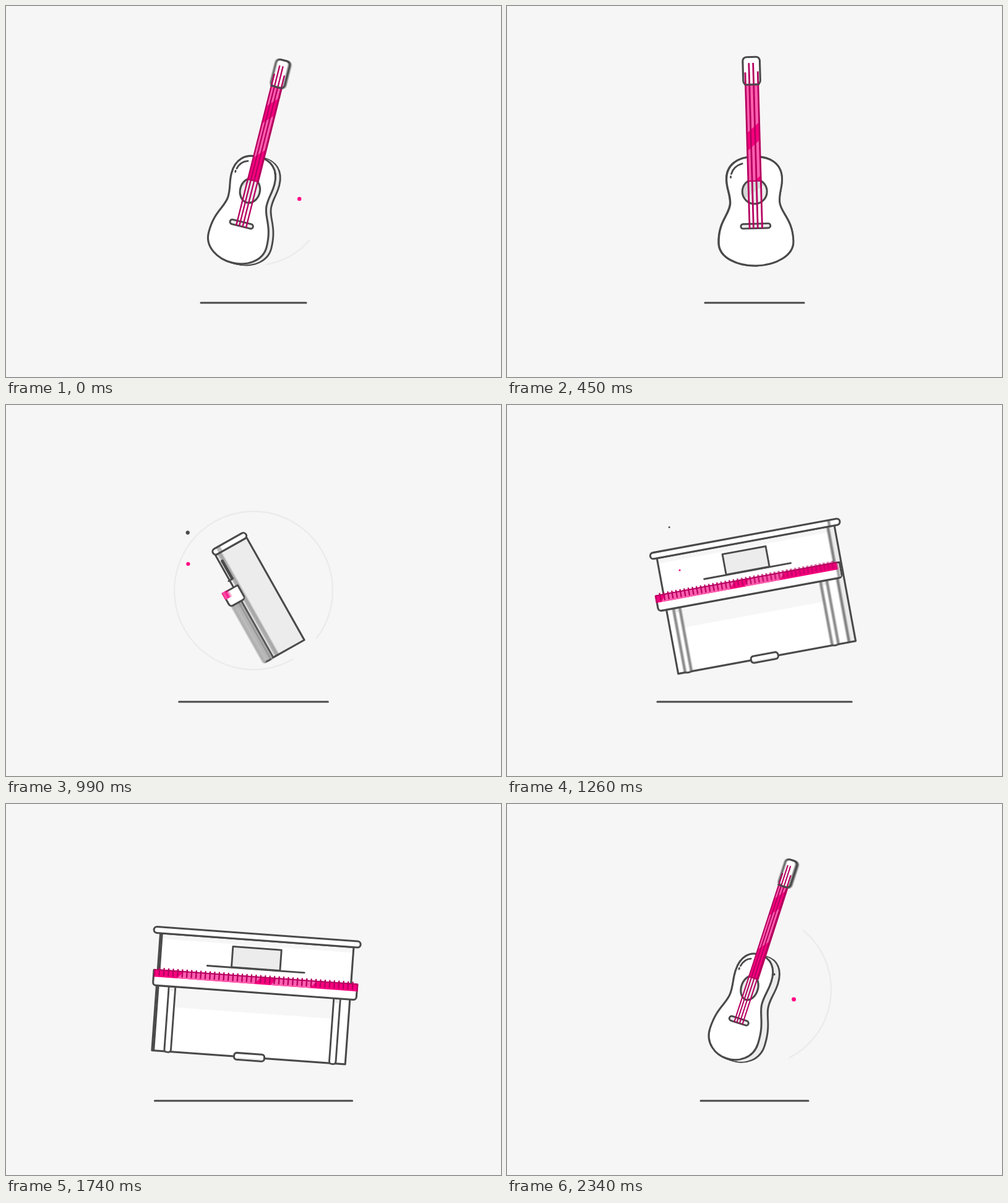
Write an HTML page with a canvas that moves like this. It is 800x600 px and loops after 2370 ms.

```html
<!DOCTYPE html>
<html lang="en">
<head>
<meta charset="utf-8">
<title>Guitar and piano</title>
<style>
html, body { margin: 0; width: 100%; height: 100%; overflow: hidden; background: #f6f6f6; }
canvas { display: block; width: 800px; height: 600px; }
</style>
</head>
<body>
<canvas id="stage" width="800" height="600"></canvas>
<script>
const LOOP = 2370, TO_PIANO = 988, TO_GUITAR = 2268;
const BG = '#f6f6f6', INK = '#4a4a4a', GREY = '#ececec', WHITE = '#fff';
const PINK = '#f7007f', LIGHT = '#ff5fb0', DEEP = '#b5005f', SPARK = '#ff0084';

const view = document.getElementById('stage').getContext('2d');
const buffer = document.createElement('canvas');
buffer.width = 800;
buffer.height = 600;
const c = buffer.getContext('2d');

// [time, tilt in degrees]
const TILT = [[-30, 18.1], [0, 14.2], [60, 11.2], [200, 6.5], [450, -1.6], [705, -12], [870, -21],
  [990, -29.4], [1050, -19], [1110, -14.5], [1260, -10.5], [1500, -3.6], [1740, 4.1], [1980, 14.4],
  [2160, 23], [2268, 30], [2340, 18.1], [2370, 14.2]];
// [time, half length of the floor line]
const FLOOR = [[-30, 87], [0, 85], [200, 81.5], [450, 80], [700, 83], [885, 97], [990, 120],
  [1080, 149], [1260, 157], [1500, 159], [1740, 159.5], [1980, 155.5], [2160, 141.5], [2268, 117],
  [2340, 87], [2370, 85]];
// [time, tail angle, head angle, radius]
const SWIRL = [[-60, -437, -437, 150], [0, -437, -370, 148], [200, -400, -60, 135],
  [290, -302, 37, 128], [360, -54, 63, 124], [390, 39, 80, 120], [440, 95, 95, 114]];

// Monotone cubic interpolation through the keys.
function at(keys, t, col = 1) {
  const n = keys.length;
  if (t <= keys[0][0]) return keys[0][col];
  if (t >= keys[n - 1][0]) return keys[n - 1][col];
  let i = 0;
  while (t > keys[i + 1][0]) i++;
  const slope = k => (keys[k + 1][col] - keys[k][col]) / (keys[k + 1][0] - keys[k][0]);
  const tangent = k => {
    if (k === 0) return slope(0);
    if (k === n - 1) return slope(n - 2);
    const a = slope(k - 1), b = slope(k);
    return a * b <= 0 ? 0 : 2 * a * b / (a + b);
  };
  const h = keys[i + 1][0] - keys[i][0], u = (t - keys[i][0]) / h;
  const p = keys[i][col], q = keys[i + 1][col];
  return p + (q - p) * u * u * (3 - 2 * u)
    + h * u * (1 - u) * ((1 - u) * tangent(i) - u * tangent(i + 1));
}

function paint(fill, stroke, width = 3.1) {
  if (fill) { c.fillStyle = fill; c.fill(); }
  if (stroke) { c.strokeStyle = stroke; c.lineWidth = width; c.stroke(); }
}

function box(x0, y0, x1, y1, r, fill, stroke, width) {
  const w = Math.max(x1 - x0, 0.1), h = y1 - y0;
  const m = Math.min(w, h) / 2;
  const radii = Array.isArray(r) ? r.map(v => Math.min(v, m)) : Math.min(r, m);
  c.beginPath();
  c.roundRect(x0, y0, w, h, radii);
  paint(fill, stroke, width);
}

function line(x0, y0, x1, y1, color = INK, width = 3.1) {
  c.beginPath();
  c.moveTo(x0, y0);
  c.lineTo(x1, y1);
  paint(null, color, width);
}

function quad(points, fill) {
  c.beginPath();
  points.forEach(p => c.lineTo(p[0], p[1]));
  c.closePath();
  paint(fill);
}

// Shared measures of a turned instrument.
function turn(tilt) {
  const a = Math.abs(tilt) / 29.5;
  const yaw = Math.min(90, 76.7 * a + 12.5 * a ** 5);
  return {
    side: tilt < 0 ? -1 : 1,
    flat: Math.max(0.004, Math.cos(yaw * Math.PI / 180)),
    depth: a ** 1.5
  };
}

function bodyPath(x, g) {
  c.beginPath();
  for (const k of [g, -g]) {
    c.moveTo(x, -56);
    c.bezierCurveTo(x + 26 * k, -57, x + 45 * k, -44, x + 45 * k, -20);
    c.bezierCurveTo(x + 45 * k, -4, x + 39.5 * k, 2, x + 40 * k, 18);
    c.bezierCurveTo(x + 41 * k, 36, x + 60.5 * k, 46, x + 60.5 * k, 82);
    c.bezierCurveTo(x + 60.5 * k, 106, x + 30 * k, 120, x, 120);
  }
}

function guitar(tilt, jitter) {
  const { side, flat: g, depth } = turn(tilt);
  const d = 23.5 * depth, x = -0.75 * d * side;
  const X = v => x + v * g;
  const back = side * d;

  const steps = Math.ceil(d / 1.5);
  for (let k = steps; k > 0; k--) { bodyPath(x + back * k / steps, g); paint(GREY, INK); }
  for (let k = steps - 1; k > 0; k--) { bodyPath(x + back * k / steps, g); paint(GREY); }
  bodyPath(x, g);
  paint(WHITE, INK);

  c.beginPath();
  c.moveTo(X(-37), -29.5);
  c.quadraticCurveTo(X(-33), -42, X(-18.7), -45.6);
  paint(null, INK, 2.8);
  line(X(-38), -25.5, X(-38.1), -23.6, INK, 2.8);

  c.beginPath();
  c.ellipse(x, 0, 20 * g, 20, 0, 0, 7);
  paint('#d6d6d6');
  c.save();
  c.clip();
  const shade = -2 - tilt;
  quad([[X(-22), shade + 15], [X(22), shade - 14], [X(22), 22], [X(-22), 22]], GREY);
  c.restore();
  c.beginPath();
  c.ellipse(x, 0, 20 * g, 20, 0, 0, 7);
  paint(null, INK);

  box(X(-24), 52.2, X(24), 59.6, 3.7, GREY, INK, 2.9);

  const lip = back * 0.2, blur = jitter * 0.5;
  const n0 = X(-10.2), n1 = X(11.2);
  box(Math.min(n0, n0 + lip), -173, Math.max(n1, n1 + lip), -17, 0, DEEP);
  c.save();
  c.beginPath();
  c.rect(n0, -173, n1 - n0, 156);
  paint(PINK);
  c.clip();
  const o = -79 - 2.8 * tilt;
  for (const [y0, y1] of [[o - 180, o - 29], [o, o + 57]])
    quad([[n0, y0 + 9], [n1, y0 - 9], [n1, y1 - 9], [n0, y1 + 9]], LIGHT);
  c.restore();
  line(n0, -17, n1, -17, DEEP, 2);

  const head = lip * 0.5 + blur;
  if (d > 1) box(X(-13.3) + lip + head, -217.6, X(14.3) + lip + head, -173, 6, INK, INK);
  box(X(-13.3) + head, -217.6, X(14.3) + head, -173, 6, WHITE, INK);
  c.lineCap = 'butt';
  [[-9.8, -193], [-3.5, -208], [3.4, -208], [10.6, -194]].forEach(([v, top]) =>
    line(X(v), top, X(v), 60, DEEP, 0.6 + 2.2 * g));
  c.lineCap = 'round';
  line(X(-11), -173, X(12), -173, INK, 2.4);
}

// Drawn with the visible side at the left, then mirrored when needed.
function piano(tilt, jitter) {
  const { side, flat: g, depth } = turn(tilt);
  const d = 51 * depth, w = (316 * g + d) / 2, shift = 3.4 * depth * depth;
  const left = -w - shift, right = w - shift;
  const corner = Math.min(left + d + jitter, right - 1);
  const mid = (left + d + right) / 2, own = mid * 0.8 + 3 * depth;
  const out = 20 * depth ** 0.9;

  c.save();
  c.scale(side, 1);
  box(left, -80, right, 110, 0, WHITE);
  box(corner, -80, right, -71, 0, BG);
  if (d > 0.5) box(left, -80, corner, 110, 0, GREY);

  const leg = 136 * g, half = 5.3 * (0.7 + 0.3 * g);
  const base = mid + out * 0.6 + jitter;
  if (g > 0.1) box(base - leg + half, 8, base + leg - half, 38, 0, BG);
  box(left, -80, right, 110, 0, null, INK);
  if (d > 1.5) line(corner, -80, corner, 110);
  for (const m of [-1, 1]) {
    const x = base + m * leg;
    box(x - half, 0, x + half, 111, [0, 0, 4, 4], WHITE, INK, 2.9);
    box(x - half + 1.5, 6, x + half - 1.5, 12, 0, GREY);
  }

  const over = 1.5 + 9.5 * g;
  box(left - over, -90, right + over, -80, 5, WHITE, INK);
  if (d > 4) line(corner - 3, -89, corner - 3, -81, INK, 2.6);

  box(own - 40 * g, -67, own + 40 * g, -33.5, 0, GREY, INK, 2.9);
  const rest = Math.max(4, 80 * g), ledge = own + 3 * depth;
  line(ledge - rest, -33, ledge + rest, -33, INK, 2.9);

  if (g > 0.1) {
    const pull = 25 * g, foot = mid * 0.7;
    box(foot - pull, 104, foot + pull, 115, 4.5, WHITE, INK);
    line(foot - pull + 4, 112, foot + pull - 4, 112, GREY, 2);
  }

  const wide = 9 * g;
  const k0 = left + d - wide, k1 = right + wide + out;
  const kf = Math.min(k0 + out + jitter, k1 - 3);
  box(k0, -20, k1, 4.8, [0, 0, 5, 5], WHITE, INK);
  if (out > 3) {
    box(k0 + 1.5, -18.5, kf, 3, 0, g > 0.3 ? GREY : WHITE);
    if (g > 0.1) line(kf, -18, kf, 4, INK, 2);
  }

  c.save();
  c.beginPath();
  c.rect(kf - 1, -21.5, k1 - kf + 2.5, 12.5);
  paint(PINK);
  c.clip();
  const o = 20 + 2 * tilt;
  c.translate((kf + k1) / 2, 0);
  c.scale(side * g, 1);
  for (const [x0, x1] of [[o - 154, o - 27], [o, o + 65]])
    quad([[x0 - 4, -9], [x0 + 8, -22], [x1 + 8, -22], [x1 - 4, -9]], LIGHT);
  c.restore();
  if (g > 0.08) {
    const count = 43, step = (k1 - kf) / (count + 1);
    for (let i = 1; i <= count; i++) {
      const x = kf + i * step;
      line(x, -23.2, x, -12, DEEP, 0.8 + 1.6 * g);
    }
    line(kf, -20.5, k1, -20.5, DEEP, 1.8);
    line(k1, -20, k1, -10, DEEP, 2);
    line(kf, -20, kf, -10, DEEP, 2);
  }
  c.restore();
}

function swirl(u) {
  if (u <= -60 || u >= 440) return;
  const rad = Math.PI / 180;
  c.beginPath();
  c.arc(400, 300, at(SWIRL, u, 3), at(SWIRL, u, 1) * rad, at(SWIRL, u, 2) * rad);
  c.lineCap = 'butt';
  paint(null, '#ebebeb', 2.4);
  c.lineCap = 'round';
}

// A spark that flies out, slows down and shrinks away.
function dot(v, life, x, y, dx, dy, ease, color, size = 4.3) {
  if (v <= 0 || v >= life) return;
  const k = 1 - Math.exp(-v / ease);
  const r = size * (1 - v / life) * Math.min(1, v / 60);
  c.beginPath();
  c.arc(x + dx * k, y + dy * k, r, 0, 7);
  paint(color);
}

function scene(t, tilt, jitter) {
  const late = t < 600 ? t + LOOP : t;
  c.fillStyle = BG;
  c.fillRect(0, 0, 800, 600);
  c.lineCap = 'round';
  c.lineJoin = 'round';
  swirl(t - 700);
  swirl(late - 1980);
  const half = at(FLOOR, t);
  line(400 - half, 480, 400 + half, 480, INK, 3.2);

  c.save();
  c.translate(400, 300);
  c.rotate(tilt * Math.PI / 180);
  (t >= TO_PIANO && t < TO_GUITAR ? piano : guitar)(tilt, jitter);
  c.restore();

  dot(late - 2220, 590, 400, 339.5, 140, -52, 200, SPARK);
  dot(late - 2220, 280, 414, 305, 39, -65, 200, INK, 3.4);
  dot(t - 790, 720, 400, 236, -144, -40, 150, INK);
  dot(t - 790, 720, 400, 186, -122, 82, 100, SPARK);
}

// Soft edges on the turning faces come from a few blended passes.
function render(t) {
  const tilt = at(TILT, t);
  const spread = Math.min(3, 9 * turn(tilt).depth);
  const passes = spread < 0.5 ? 1 : 6;
  for (let i = 0; i < passes; i++) {
    scene(t, tilt, passes > 1 ? spread * (i / (passes - 1) * 2 - 1) : 0);
    view.globalAlpha = 1 / (i + 1);
    view.drawImage(buffer, 0, 0);
  }
}

const begin = performance.now();
function tick() {
  render((performance.now() - begin) % LOOP);
  requestAnimationFrame(tick);
}
tick();
</script>
</body>
</html>
```
